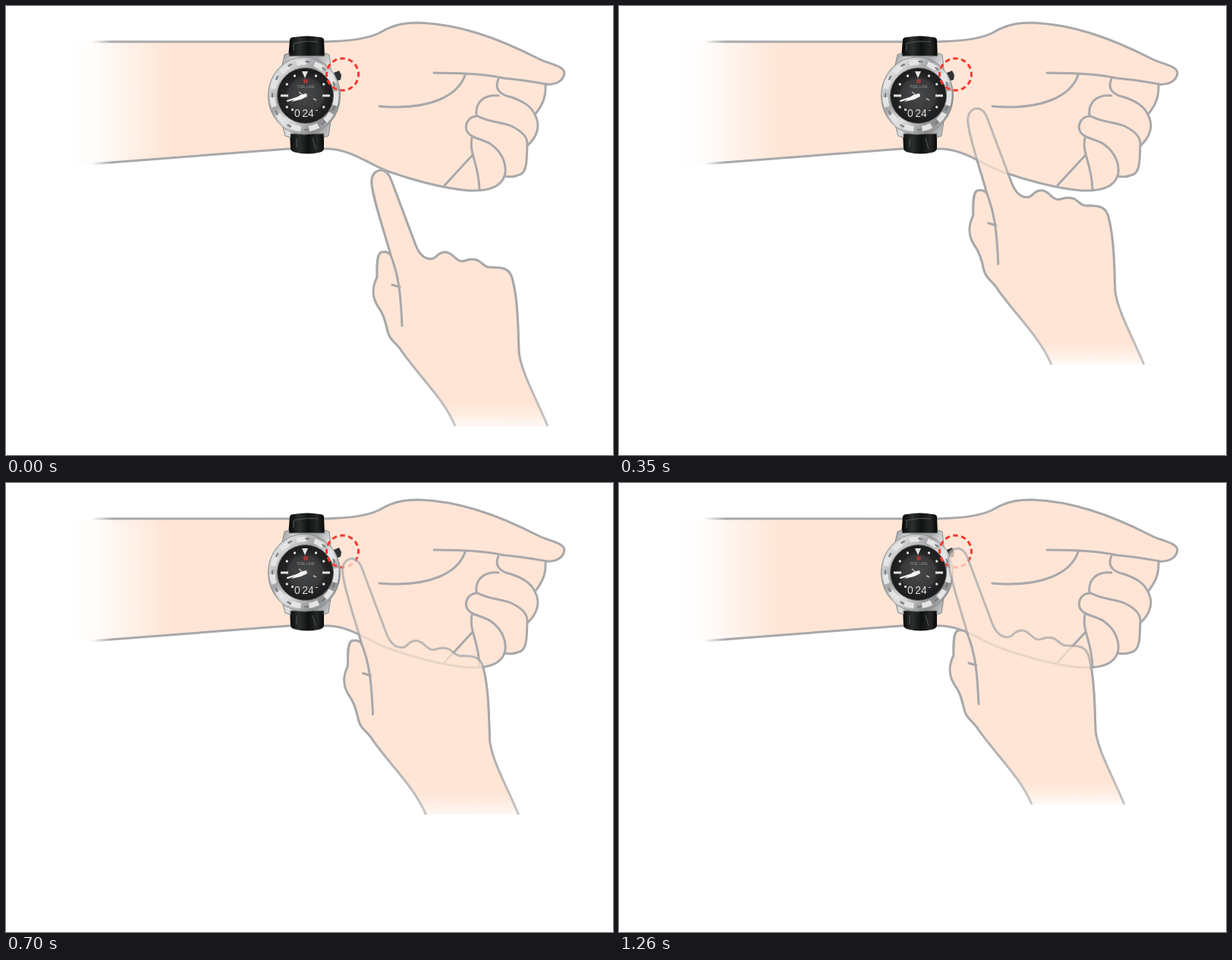
An HTML page that plays this animation: 800 by 591 pixels, repeating every 1750 ms.

```html
<!DOCTYPE html>
<html lang="en">
<head>
<meta charset="utf-8">
<title>Press the watch button</title>
<style>
  html, body { margin: 0; width: 100%; height: 100%; overflow: hidden; background: #fff; }
  svg { display: block; width: 100%; height: 100%; }
  .line { fill: none; stroke: #a8a8aa; stroke-width: 3; stroke-linecap: round; stroke-linejoin: round; }
  text { font-family: "Liberation Sans", Arial, sans-serif; text-anchor: middle; }
</style>
</head>
<body>
<svg viewBox="0 0 800 591" preserveAspectRatio="none">
  <defs>
    <linearGradient id="armSkin" gradientUnits="userSpaceOnUse" x1="78" y1="0" x2="214" y2="0">
      <stop offset="0" stop-color="#ffe5d5" stop-opacity="0"/>
      <stop offset=".3" stop-color="#ffe5d5" stop-opacity=".14"/>
      <stop offset="1" stop-color="#ffe5d5"/>
    </linearGradient>
    <linearGradient id="armEdge" gradientUnits="userSpaceOnUse" x1="112" y1="0" x2="140" y2="0">
      <stop offset="0" stop-color="#a8a8aa" stop-opacity="0"/>
      <stop offset="1" stop-color="#a8a8aa"/>
    </linearGradient>
    <linearGradient id="handSkin" gradientUnits="userSpaceOnUse" x1="0" y1="518" x2="0" y2="562">
      <stop offset="0" stop-color="#ffe5d5"/>
      <stop offset=".6" stop-color="#ffe5d5" stop-opacity=".32"/>
      <stop offset="1" stop-color="#ffe5d5" stop-opacity="0"/>
    </linearGradient>
    <linearGradient id="handEdge" gradientUnits="userSpaceOnUse" x1="0" y1="440" x2="0" y2="556">
      <stop offset="0" stop-color="#a8a8aa"/>
      <stop offset="1" stop-color="#a8a8aa" stop-opacity=".45"/>
    </linearGradient>
    <linearGradient id="steel" x1="0" y1="0" x2="1" y2="1">
      <stop offset="0" stop-color="#8d8f91"/>
      <stop offset=".18" stop-color="#d9dadb"/>
      <stop offset=".38" stop-color="#a3a5a7"/>
      <stop offset=".55" stop-color="#e0e0e0"/>
      <stop offset=".78" stop-color="#8c8e90"/>
      <stop offset="1" stop-color="#cfd0d1"/>
    </linearGradient>
    <linearGradient id="strap" x1="0" y1="0" x2="1" y2="0">
      <stop offset="0" stop-color="#050505"/>
      <stop offset=".3" stop-color="#2b302d"/>
      <stop offset=".55" stop-color="#101211"/>
      <stop offset=".8" stop-color="#252826"/>
      <stop offset="1" stop-color="#050505"/>
    </linearGradient>
    <radialGradient id="dial">
      <stop offset="0" stop-color="#48494b"/>
      <stop offset=".6" stop-color="#38393b"/>
      <stop offset=".72" stop-color="#232426"/>
      <stop offset="1" stop-color="#1b1c1d"/>
    </radialGradient>

    <path id="outline" d="M592 553C577 517 547 490 522 455C515 443 506 441 503 428C499 411 497 405 490 395C482 383 483 369 489 357C489 345 488 326 495 324C501 323 505 325 507 328C503 310 480 245 482 229C483 219 490 216 495 216C502 217 506 224 508 230L540 315C544 325 550 333 560 333C568 333 568 324 579 324C589 324 592 336 601 336C606 336 612 331 622 335C630 340 632 345 640 344C655 344 665 345 668 362C674 385 675 420 676 456C679 482 698 515 714 553"/>
    <g id="hand">
      <use href="#outline" fill="url(#handSkin)"/>
      <use href="#outline" class="line" style="stroke:url(#handEdge);stroke-linecap:butt"/>
      <path class="line" d="M507 328C517 353 520 375 522 421M509 367L519 370"/>
    </g>
  </defs>

  <!-- Solid copy below the arm, translucent copy above it -->
  <use href="#hand" class="mover"/>

  <g id="arm">
    <path fill="url(#armSkin)" stroke="url(#armEdge)" stroke-width="3" stroke-linejoin="round" d="M70 47H420C450 46 474 44 491 36C507 26 522 22 545 22C596 24 646 41 701 69C713 76 735 78 736 88C735 99 724 104 711 103C712 121 706 132 697 143C704 155 702 171 687 184C686 201 688 221 674 223C669 225 662 225 657 224C652 238 635 244 610 243C575 240 532 228 502 217C478 208 455 189 425 188L372 188C330 192 250 197 125 207L70 211Z"/>
    <path class="line" d="M564 88C602 88 635 90 656 95C680 97 696 100 713 103M605 91C596 117 560 138 492 132
      M649 96C643 110 652 117 666 120C680 125 692 131 697 143
      M649 118C630 116 618 127 620 144C637 154 653 152 666 158C680 165 688 172 687 184
      M620 145C607 146 602 161 611 169C615 174 631 176 639 182C655 193 661 211 657 224
      M614 174C610 195 623 206 624 242M615 196L578 236"/>
  </g>

  <g id="watch">
    <path fill="url(#strap)" d="M372 68L374 44Q375 41 380 41Q397 38 413 41Q418 41 419 44L420 68ZM374 166H419V188Q418 192 412 193Q397 196 383 193Q376 192 375 188Z"/>
    <path fill="none" stroke="#565a57" stroke-width="1" d="M379 59V49Q396 45 411 47M383 174V186M404 174L408 188"/>
    <path fill="url(#steel)" stroke="#85878a" stroke-width="1" d="M367 64L373 62V66H420V62L426 64L429 92V145L425 171L419 173V168H375V173L368 171L361 145V92Z"/>
    <path fill="#303234" d="M432 88L439 85L442 91L441 97L435 99Z"/>
    <ellipse cx="393" cy="118" rx="47.500" ry="51" fill="url(#steel)" stroke="#85878a"/>
    <g fill="none">
      <ellipse cx="393" cy="118" rx="42" ry="44" stroke="#e4e4e4" stroke-width="7" stroke-dasharray="13 11"/>
      <ellipse cx="393" cy="118" rx="42" ry="45" stroke="#77797b" stroke-width="2" stroke-dasharray="6 18" stroke-dashoffset="-14"/>
    </g>
    <ellipse cx="394.500" cy="118" rx="37" ry="36.500" fill="url(#dial)" stroke="#626466"/>
    <g id="marks" fill="#e2e2e2">
      <path d="M390 86H398L394 95ZM362 116.500H372V119.500H362ZM417 116.500H427V119.500H417Z"/>
    </g>
    <circle cx="395" cy="99" r="3" fill="#a23836"/>
    <text x="395" y="108" font-size="5" fill="#949494">TIDE LINE</text>
    <path stroke="#f5f5f5" stroke-linecap="round" d="M395 117L371 125" stroke-width="2"/>
    <path fill="#f5f5f5" d="M396 115L388 117L376 126L389 123L397 119Z"/>
    <path stroke="#bbb" d="M386 113L391 117M405 122L409 124" stroke-width="1.5"/>
    <g fill="#dedede" font-size="14">
      <text x="384" y="146">0</text>
      <text x="398" y="146">24</text>
    </g>
    <path fill="#c8c8c8" d="M376 135H379V138H376ZM408 137H411V138H408Z"/>
  </g>

  <circle cx="443.500" cy="90" r="21" fill="none" stroke="#f3392d" stroke-width="3" pathLength="120" stroke-dasharray="6 4" stroke-dashoffset="3"/>

  <use href="#hand" class="mover" opacity=".74"/>
</svg>
<script>
  const LOOP = 1750, STEP = 70;
  const movers = document.querySelectorAll('.mover');
  const marks = document.getElementById('marks');

  for (const deg of [30, 60, 120, 240, 300, 330]) {
    const a = deg * Math.PI / 180;
    const dot = document.createElementNS('http://www.w3.org/2000/svg', 'circle');
    dot.setAttribute('cx', 394.5 + 28 * Math.sin(a));
    dot.setAttribute('cy', 118 - 30 * Math.cos(a));
    dot.setAttribute('r', 1.7);
    marks.append(dot);
  }

  const easeOut = (p, power) => 1 - (1 - p) ** power;
  const mix = (a, b, p) => a.map((v, i) => v + (b[i] - v) * p);
  const start = [0, 0], near = [-26.5, -97], press = [-48, -132], rest = [-48, -130];

  // Approach, reach the button, then relax slightly.
  function pose(n) {
    if (n < 8) return mix(start, near, easeOut(n / 8, 1.85));
    if (n < 14) return mix(near, press, easeOut((n - 8) / 6, 2));
    return mix(press, rest, Math.min(1, (n - 14) / 4));
  }

  function draw() {
    const n = Math.floor(performance.now() % LOOP / STEP);
    const [x, y] = pose(n);
    for (const m of movers) m.setAttribute('transform', `translate(${x} ${y})`);
    requestAnimationFrame(draw);
  }
  draw();
</script>
</body>
</html>
```
